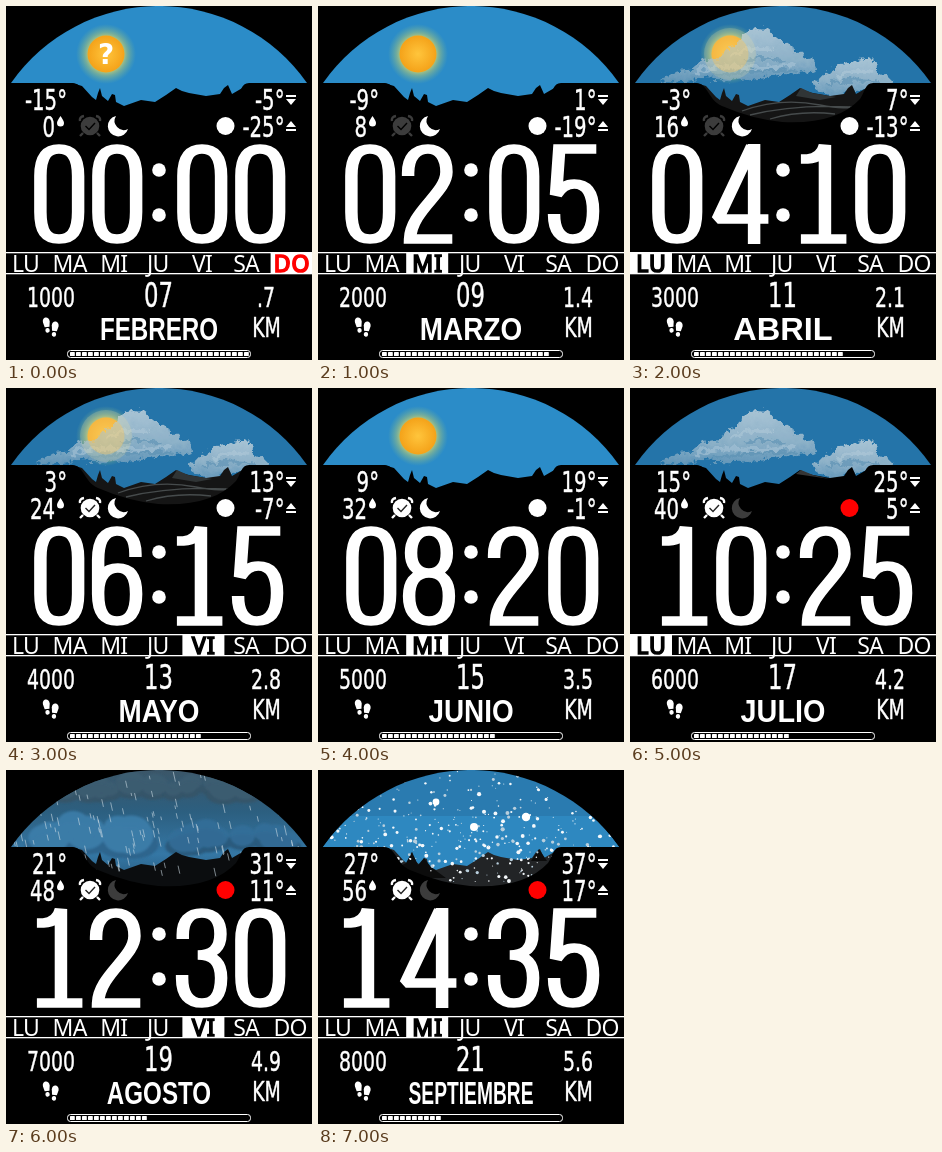
Recreate the animation shown at these times as an HTML page. Size 306 by 354 pixels, loop 8000 ms.

```html
<!DOCTYPE html>
<html lang="es">
<head>
<meta charset="utf-8">
<style>
  html, body { margin: 0; width: 100%; height: 100%; overflow: hidden; background: #000; }
  svg { display: block; width: 306px; height: 354px; }
  .narrow { font-family: "DejaVu Sans", sans-serif; fill: #fff; stroke: #fff; stroke-width: .5; }
  .month { font: bold 31px "Liberation Sans", Arial, sans-serif; fill: #fff; text-anchor: middle; }
  .week { font: 23px "Noto Sans", sans-serif; letter-spacing: -.8px; text-anchor: middle; }
  .active { stroke: currentColor; stroke-width: 1.7; letter-spacing: 1px; }
  .big { fill: none; stroke: #fff; stroke-width: 9.6; stroke-miterlimit: 1.6; }
</style>
</head>
<body>
<svg id="face" viewBox="0 0 306 354" role="img" aria-label="Reloj">
  <defs>
    <clipPath id="dome"><path d="M5 77A180.7 180.7 0 0 1 301 77V120H5Z"/></clipPath>
    <radialGradient id="glow">
      <stop offset=".5" stop-color="#e9dc62" stop-opacity=".95"/>
      <stop offset=".72" stop-color="#a9c67c" stop-opacity=".55"/>
      <stop offset="1" stop-color="#7db98f" stop-opacity="0"/>
    </radialGradient>
    <radialGradient id="sun">
      <stop offset="0" stop-color="#ffc53c"/>
      <stop offset="1" stop-color="#f4a219"/>
    </radialGradient>
    <linearGradient id="storm" x2="0" y2="1">
      <stop offset="0" stop-color="#3b5668"/>
      <stop offset=".35" stop-color="#2c5f80"/>
      <stop offset=".7" stop-color="#3577a5"/>
      <stop offset="1" stop-color="#245475"/>
    </linearGradient>
    <linearGradient id="puff" x2="0" y2="1">
      <stop offset="0" stop-color="#b3cad8"/>
      <stop offset=".6" stop-color="#94b5ca"/>
      <stop offset="1" stop-color="#6397b9"/>
    </linearGradient>
    <filter id="soft"><feGaussianBlur stdDeviation="1.3"/></filter>
    <filter id="ragged">
      <feTurbulence baseFrequency=".09" numOctaves="3" seed="4"/>
      <feDisplacementMap in="SourceGraphic" scale="9" xChannelSelector="R" yChannelSelector="G"/>
      <feGaussianBlur stdDeviation=".5"/>
    </filter>
  </defs>
  <g id="sky" clip-path="url(#dome)"></g>
  <path d="M0 77H66C78 77 78 94 92 100Q122 113 152 116Q206 119 230 93C235 86 235 77 243 77H306V354H0Z"/>
  <g id="info"></g>
</svg>
<script>
const STEP = 1000;
const DAYS = ["LU", "MA", "MI", "JU", "VI", "SA", "DO"];

// month, glyph width, weekday, weather
const STATES = [
  ["FEBRERO", .78, 6, "unknown"],
  ["MARZO", .9, 2, "clear"],
  ["ABRIL", 1.05, 0, "partly"],
  ["MAYO", .9, 4, "partly"],
  ["JUNIO", .9, 2, "clear"],
  ["JULIO", .93, 0, "cloudy"],
  ["AGOSTO", .78, 4, "rain"],
  ["SEPTIEMBRE", .62, 2, "snow"]
];

// advance and centre line of each large digit; drawn 1.3 times wider,
// which makes upright strokes heavier than level ones
const WIDE = 1.3;
const DIGITS = {
  0: [58, "M8 32C8 12 13 5 22.3 5S37 12 37 32V68C37 88 32 95 22.3 95S8 88 8 68Z"],
  1: [54, "M3 15H8Q19 14 21.5 1V95M3 95H38"],
  2: [59, "M7 32V29C7 13 13 5 22.3 5S36.5 14 36.5 28C36.5 49 9 67 8.5 95H41"],
  3: [58, "M7.5 31V27C7.5 12 13 5 22.3 5S36.5 13 36.5 26C36.5 40 31 47 19 47C32 47 37 55 37 70C37 88 31.5 95 22.3 95S7 88 7 70V67"],
  4: [64, "M37 100V0M35.5 2L9 75H48"],
  5: [58, "M41 5H12.5L10 51C14 43 18.5 40 24 40C34 40 38.5 50 38.5 67C38.5 87 32.5 95 23 95S8.5 87 8.5 70"],
  6: [58, "M36.5 31V28C36.5 12 31.5 5 22.3 5S7.8 14 7.8 34V68C7.8 87 12.5 95 22.3 95S37 87 37 68C37 50 32 42 23 42S7.8 50 7.8 66"],
  8: [58, "M22.3 47C12 47 8.5 38 8.5 27S12 5 22.3 5S36 16 36 27S32 47 22.3 47C11 47 7 57 7 70S11 95 22.3 95S37.6 84 37.6 70S33 47 22.3 47Z"]
};

const pad = n => String(n).padStart(2, "0");
const path = (d, fill = "#fff", more = "") => `<path d="${d}" fill="${fill}" ${more}/>`;
const line = (d, color, width, more = "") => path(d, "none", `stroke="${color}" stroke-width="${width}" ${more}`);
const oval = (x, y, rx, ry, fill, more = "") =>
  `<ellipse cx="${x}" cy="${y}" rx="${rx}" ry="${ry}" fill="${fill}" ${more}/>`;
const dot = (x, y, r, fill, more) => oval(x, y, r, r, fill, more);
const rect = (x, y, w, h, fill, more = "") =>
  `<rect x="${x}" y="${y}" width="${w}" height="${h}" fill="${fill}" ${more}/>`;
const label = (x, y, str, anchor = "end", size = 28.6) =>
  `<text class="narrow" font-size="${size}" text-anchor="${anchor}" transform="translate(${x} ${y}) scale(.69 1)">${str}</text>`;

function random(seed) {
  return () => (seed = (seed * 16807) % 2147483647) / 2147483647;
}

function stormCloud(x, y, w, h, light, dark, seed) {
  const rnd = random(seed);
  let back = "", front = "";
  for (let i = 0; i < 18; i++) {
    const u = rnd() * 2 - 1, r = h * (.22 + .2 * rnd());
    const px = x + u * w * .44, py = y - rnd() * (1 - u * u) * h * .4;
    back += oval(px, py + h * .2, r * 1.5, r * .8, dark);
    front += oval(px, py, r * 1.2, r, light);
  }
  return `<g filter="url(#soft)">${back}<g opacity=".85">${front}</g></g>`;
}

function clouds() {
  return `<g filter="url(#ragged)" opacity=".93">` +
    path("M28 73Q44 60 60 62Q74 49 90 50Q94 37 106 37Q110 20 125 20Q143 20 145 34Q163 33 162 45Q184 50 184 61Q170 68 150 66Q110 75 70 71Q45 77 28 73Z", "url(#puff)") +
    path("M180 77Q186 67 200 65Q206 53 220 54Q238 45 246 57Q240 62 250 67Q262 71 262 77Q220 84 202 90Q190 84 180 77Z", "url(#puff)") +
    line("M62 66Q85 56 108 59T165 56M100 48Q118 38 140 42M205 70Q222 60 240 64", "#c3d5df", 4, 'opacity=".45"') +
    line("M80 68Q120 61 165 63M112 53Q130 48 152 53M196 77Q220 71 246 74", "#5c90b3", 3, 'opacity=".55"') + "</g>";
}

function sunDisc() {
  return dot(100, 48, 30, "url(#glow)") + dot(100, 48, 18.5, "url(#sun)");
}

function rain() {
  const rnd = random(91);
  let d = "";
  for (let i = 0; i < 150; i++) {
    const len = 3 + rnd() * 7;
    d += `M${5 + rnd() * 296} ${rnd() * 100}l${len * .22} ${len}`;
  }
  return line(d, "#cfdde6", .9, 'opacity=".65"');
}

function snow() {
  const rnd = random(407);
  let out = "";
  for (let i = 0; i < 430; i++)
    out += dot(5 + rnd() * 296, 112 * rnd() ** .7, .5 + 1.6 * rnd() ** 2, i % 3 ? "#f4f8fb" : "#b9cfdd");
  return out + dot(208, 47, 4.2, "#fff") + dot(118, 32, 3.4, "#fff") + dot(156, 57, 4, "#fff");
}

function hills(fill) {
  return path("M66 77L76 80L86 91L90 94L92 87L94 82L96 90L102 95L106 88L109 89L110 96L118 100" +
    "L135 94L149 96L160 89L170 82L176 85L183 87L200 90L214 88L218 82L222 79L226 88L245 77V120H66Z", fill);
}

const clearSky = () => rect(0, 0, 306, 120, "#2b8cc8") + sunDisc();

const WEATHER = {
  clear: () => clearSky() + hills("#000"),
  unknown: () => clearSky() +
    '<text x="100" y="58" text-anchor="middle" font-family="DejaVu Sans, sans-serif" font-weight="bold" font-size="28" fill="#fff">?</text>' +
    hills("#000"),
  partly: () => rect(0, 0, 306, 120, "#2474a9") + sunDisc() + clouds() +
    dot(100, 48, 26, "#f0dfa0", 'opacity=".2"') + dot(100, 48, 18.5, "#f5c65c", 'opacity=".35"') +
    hills("#151515") +
    line("M112 105Q150 91 190 99T232 92M120 109Q165 98 220 101M140 113Q170 104 205 108", "#464b4c", 1.3) +
    path("M166 90L171 82L182 87L206 91L190 94Z", "#303536"),
  cloudy: () => rect(0, 0, 306, 120, "#2474a9") + clouds() +
    hills("#000") + path("M166 86L171 82L183 87L200 91Z", "#353535"),
  rain: () => rect(0, 0, 306, 120, "url(#storm)") +
    stormCloud(150, 20, 240, 30, "#3d5d72", "#345469", 8) +
    stormCloud(87, 68, 110, 42, "#3e7fac", "#2d658d", 19) +
    stormCloud(230, 70, 120, 32, "#346f99", "#295a7d", 44) +
    hills("#0b0d0f") + rain(),
  snow: () => rect(0, 0, 306, 120, "#2a7bb0") + rect(0, 46, 306, 74, "#2e88c0") +
    hills("#222426") +
    path("M80 97L88 93L94 82L100 95L106 88L113 97L128 108H100ZM213 91L221 79L229 91Z", "#0c0c0c") + snow()
};

function pair(str, x, fromRight) {
  if (fromRight) x -= [...str].reduce((sum, c) => sum + DIGITS[c][0], 0);
  return [...str].map(c => {
    const [advance, d] = DIGITS[c];
    const glyph = `<path class="big" d="${d}" transform="translate(${x} 138) scale(${WIDE} 1)"/>`;
    x += advance;
    return glyph;
  }).join("");
}

function clock(i) {
  return `<g aria-label="${pad(i * 2)}:${pad(i * 5)}">` + pair(pad(i * 2), 140, true) +
    dot(153, 164, 6.8, "#fff") + dot(153, 209, 6.8, "#fff") + pair(pad(i * 5), 167) + "</g>";
}

function week(active) {
  const at = k => 21 + k * 44.1;
  const strip = rect(0, 246, 306, 1.3, "#fff") + rect(0, 267, 306, 1.3, "#fff");
  return strip + DAYS.map((name, k) => {
    const on = k === active;
    const fill = on ? (k === 6 ? "#f00" : "#000") : "#fff";
    const box = on ? rect(at(k) - 21, 246, 42, 22, "#fff") : "";
    const x = on ? at(k) + .5 : at(k) - 1.5;
    return `${box}<text class="week${on ? " active" : ""}" x="${x}" y="265.5" fill="${fill}" color="${fill}">${name}</text>`;
  }).join("");
}

function alarm(on) {
  const c = on ? "#fff" : "#3c3c3c", mark = on ? "#222" : "#000";
  return line("M74 115Q73 111 78 110M90 110Q95 111 94 115M77 127L74 130M91 127L94 130", c, 2.4) +
    dot(84, 120, 9.3, c) + line("M79.5 120L83 123.5L89 117", mark, 1.4);
}

function icons(i) {
  return alarm(i > 2) +
    path("M110 110A10.3 10.3 0 1 0 122 123A9.2 9.2 0 0 1 110 110Z", i < 5 ? "#fff" : "#3c3c3c") +
    dot(219.5, 120, 9, i < 5 ? "#fff" : "#f00") +
    path("M54.5 110Q58 115 58 117A3.5 3.5 0 0 1 51 117Q51 115 54.5 110Z") +
    path("M280 89H290V91H280ZM280 93H290L285 99ZM280 121H290L285 115ZM280 123H290V125H280Z");
}

function foot(x, y, side) {
  return `<g transform="translate(${x} ${y}) rotate(${-8 * side})">` +
    path("M-3.4 -1C-4 -7 3.6 -7 3.4 -1L2.4 4H-2.4Z") + oval(0, 7.5, 2.2, 2.4, "#fff") + "</g>";
}

function battery(i) {
  const count = i ? 31 - 3 * i : 30;
  let out = rect(61.5, 344.5, 183, 7, "none", 'rx="3" stroke="#fff"');
  for (let k = 0; k < count; k++) out += rect(64 + k * 6, 346, 4.8, 4, "#fff", 'rx=".6"');
  return out;
}

function info(i) {
  const [name, width, day] = STATES[i];
  const km = (.7 * (i + 1)).toFixed(1).replace(/^0/, "");
  return label(61, 103.5, 6 * i - 15 + "°") + label(278.5, 103.5, 6 * i - 5 + "°") +
    label(49, 130.5, 8 * i) + label(278.5, 130.5, 6 * i - 25 + "°") +
    icons(i) + clock(i) + week(day) +
    label(45, 301, 1000 * (i + 1), "middle", 27.4) +
    label(152.5, 301, pad(7 + 2 * i), "middle", 33) +
    label(260, 301, km, "middle", 27.4) + label(260.5, 331, "KM", "middle", 27.4) +
    foot(40.5, 317, 1) + foot(49, 321, -1) +
    `<text class="month" transform="translate(153 334) scale(${width} 1)">${name}</text>` +
    battery(i);
}

const sky = document.getElementById("sky");
const panel = document.getElementById("info");
let shown = -1;

function draw() {
  const i = Math.floor(performance.now() / STEP) % STATES.length;
  if (i !== shown) {
    shown = i;
    sky.innerHTML = WEATHER[STATES[i][3]]();
    panel.innerHTML = info(i);
  }
  requestAnimationFrame(draw);
}
draw();
</script>
</body>
</html>
```
